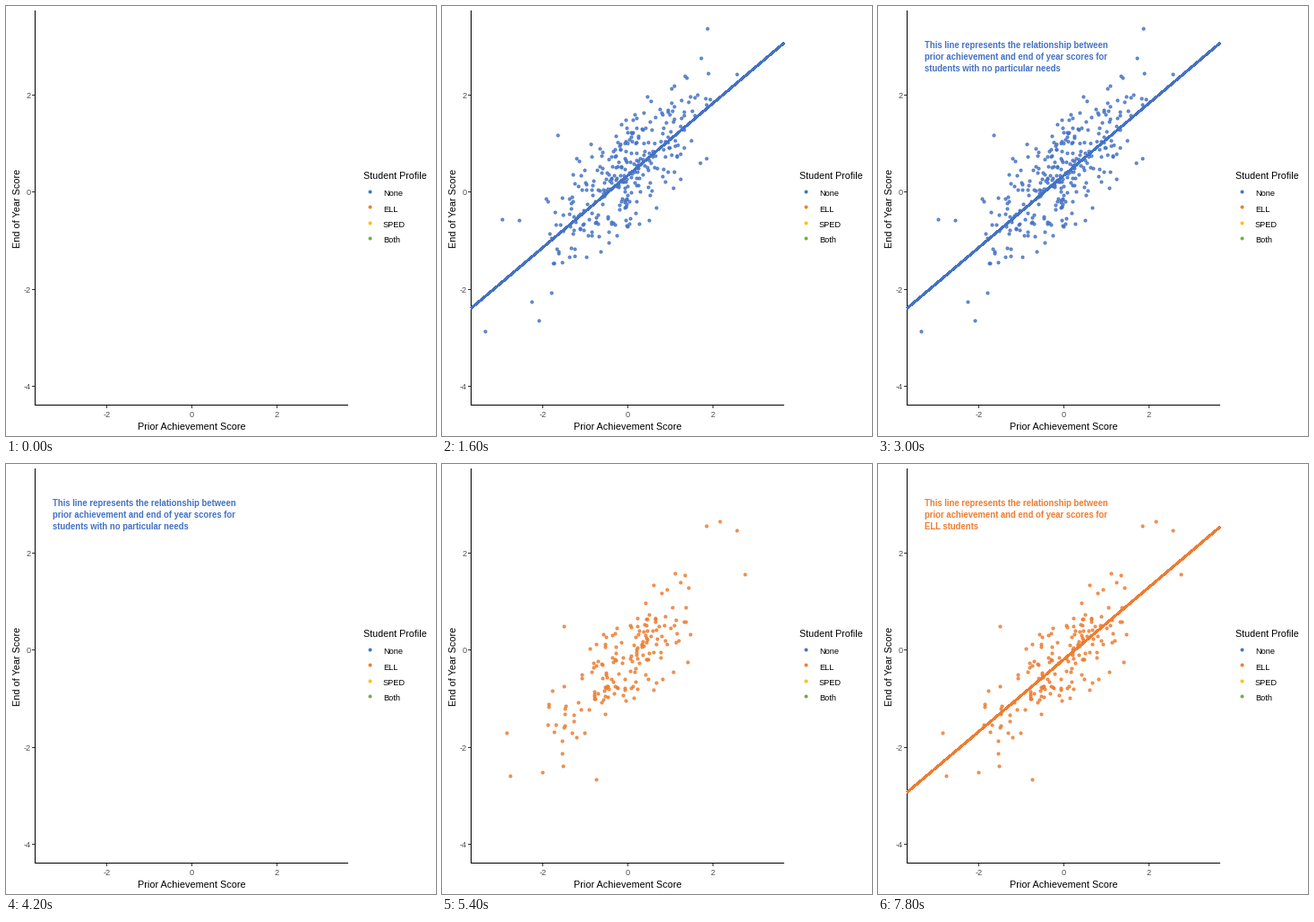
Animation, 480 px wide and 480 px high, one loop 8 s. Source, as a matplotlib script:

```python
import numpy as np
import matplotlib.pyplot as plt
from matplotlib.animation import FuncAnimation

SIZE, DPI = 480, 100
PT = 72 / DPI  # points per pixel
STEP = 200     # ms per frame
FRAMES = 40
BLUE, ORANGE, YELLOW, GREEN = "#4472C4", "#ED7D31", "#FFC000", "#70AD47"
LEFT, RIGHT, SLOPE = 32.5, 382, -0.848

plt.rcParams["font.family"] = "Liberation Sans"
fig = plt.figure(figsize=(SIZE / DPI, SIZE / DPI), dpi=DPI, facecolor="white")
ax = fig.add_axes([0, 0, 1, 1])
ax.set(xlim=(0, SIZE), ylim=(SIZE, 0))
ax.axis("off")


def stroke(xs, ys, color, width=1, **kw):
    return ax.plot(xs, ys, color=color, lw=width * PT, snap=False,
                   solid_capstyle="butt", **kw)[0]


def label(x, y, text, size, color="black", **kw):
    return ax.text(x, y, text, fontsize=size * PT, color=color,
                   va=kw.pop("va", "baseline"), **kw)


def dots(points, color, fill=0.7):
    x, y = np.round(points).T
    return ax.scatter(x, y, s=(3 * PT) ** 2, facecolor=(color, fill),
                      edgecolor=color, linewidth=PT, antialiased=False,
                      zorder=2)


def trend(x, start):
    return start + SLOPE * (x - LEFT)


def cloud(seed, count, center, spread, noise, start, extremes):
    """Seeded scatter around the trend line, plus a few far points."""
    rng = np.random.default_rng(seed)
    points = []
    while len(points) < count:
        dx, r = rng.normal(0, spread), rng.normal(0, noise)
        if abs(dx) < 2 * spread and abs(r) < 1.9 * noise:
            points.append((center + dx, trend(center + dx, start) + r))
    return points + extremes


def trend_line(start, color):
    ends = np.array([LEFT, RIGHT])
    return stroke(ends, trend(ends, start), color, 2, antialiased=False,
                  zorder=3)


def axes_frame():
    stroke([32.5, 32.5], [5, 446], "black")
    stroke([32, 382], [445.5, 445.5], "black")
    for value in (-2, 0, 2):
        x = int(207.5 + 47.6 * value) + 0.5
        stroke([x, x], [446, 449], "#333333")
        label(x, 459, str(value), 9.2, "#4D4D4D", ha="center")
    for value in (-4, -2, 0, 2):
        y = int(207.8 - 54.2 * value) + 0.5
        stroke([29, 32], [y, y], "#333333")
        label(27.5, y + 3.5, str(value), 9.2, "#4D4D4D", ha="right")
    label(207, 473, "Prior Achievement Score", 10.9, ha="center")
    label(13, 226, "End of Year Score", 10.9, ha="center", va="center",
          rotation=90)


def legend():
    label(399, 193, "Student Profile", 10.6)
    rows = zip(("None", "ELL", "SPED", "Both"), (BLUE, ORANGE, YELLOW, GREEN))
    for i, (name, color) in enumerate(rows):
        dots([(406, 207 + 17.3 * i)], color, fill=1)
        label(421, 212.3 + 17.3 * i, name, 9.3)


def note(last_line, color):
    lines = ("This line represents the relationship between",
             "prior achievement and end of year scores for", last_line)
    return [label(52, 47 + 13 * i, line, 9.55, color, weight="bold")
            for i, line in enumerate(lines)]


BLUE_START, ORANGE_START = 337.5, 366.5
blue_far = [(296, 25), (289, 58), (329, 76), (129, 144), (67, 238),
            (86, 239), (100, 330), (108, 351), (48, 363)]
orange_far = [(295, 69), (310, 64), (329, 74), (338, 123), (136, 181),
              (72, 300), (76, 348), (112, 344), (172, 352)]

axes_frame()
legend()

blue_dots = dots(cloud(7, 310, 207, 47, 37, BLUE_START, blue_far), BLUE)
blue_line = trend_line(BLUE_START, BLUE)
blue_note = note("students with no particular needs", BLUE)
orange_dots = dots(cloud(11, 172, 203, 44, 32, ORANGE_START, orange_far),
                   ORANGE)
orange_line = trend_line(ORANGE_START, ORANGE)
orange_note = note("ELL students", ORANGE)

# (artists, start ms, end ms)
schedule = [
    ([blue_dots], 200, 4200),
    ([blue_line], 1600, 4200),
    (blue_note, 3000, 5400),
    ([orange_dots], 5400, 8000),
    ([orange_line], 6600, 8000),
    (orange_note, 7800, 8000),
]


def update(frame):
    t = frame * STEP
    for artists, start, end in schedule:
        for artist in artists:
            artist.set_visible(start <= t < end)
    # The blue layer fades for one step before it goes.
    fade = 0.5 if t >= 4000 else 1
    blue_dots.set_facecolor((BLUE, 0.7 * fade))
    blue_dots.set_edgecolor((BLUE, fade))
    blue_line.set_alpha(fade)
    return [a for artists, _, _ in schedule for a in artists]


anim = FuncAnimation(fig, update, frames=FRAMES, interval=STEP,
                     repeat=True, repeat_delay=0, blit=False)
plt.show()
```
